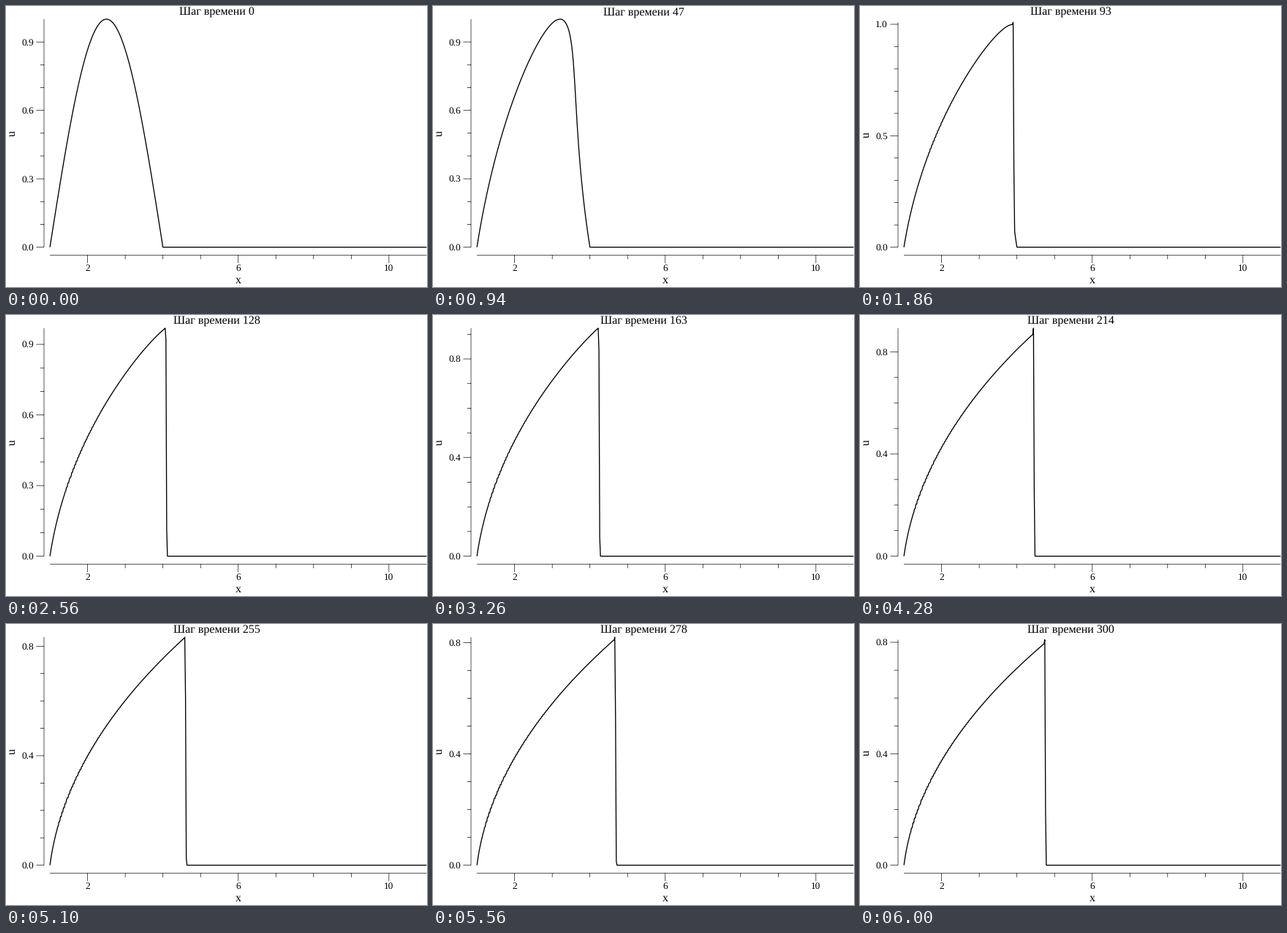
Recreate the animation shown at these times as a matplotlib script. Size 576 by 384 pixels, loop 6.02 s.

```python
import numpy as np
import matplotlib.pyplot as plt
from matplotlib.animation import FuncAnimation

plt.rcParams.update({
    "font.family": "Liberation Serif",
    "text.hinting": "none",
    "path.simplify": False,
})

W, H, DPI = 576, 384, 96
STEPS, CELLS = 300, 500
DT, DX = 0.015, 10 / CELLS

# Plot area in pixels
LEFT, RIGHT, TOP, BOTTOM = 60.1, 575.4, 18.0, 329.6
AXIS_X, AXIS_Y = 52.0, 340.7
MAJOR, MINOR = 10.67, 5.33
LABEL_ROOM = 7.0


def advance(u):
    """One flux-limited Lax-Wendroff step of u_t + (u^3 / 3)_x = 0."""
    r = DT / DX
    f = u ** 3 / 3
    d = np.diff(u)
    ratio = np.ones(CELLS - 1)
    np.divide(d[1:], d[:-1], out=ratio, where=d[:-1] != 0)
    limiter = np.concatenate([[0], np.clip(ratio, 0, 1)])
    flow = f[:-1] + 0.5 * limiter * (1 - r * u[:-1] ** 2) * np.diff(f)
    new = u.copy()
    new[1:-1] -= r * np.diff(flow)
    return new


x = 1 + DX * np.arange(CELLS + 1)
u = np.where(x < 4 - DX / 2, np.sin(np.pi * (x - 1) / 3), 0.0)
states = [u]
for _ in range(STEPS):
    states.append(advance(states[-1]))


def px(v):
    return LEFT + (v - 1) / 10 * (RIGHT - LEFT)


def tick_step(top):
    """Major tick distance in tenths for the range 0..top."""
    if top > 1:
        return 5
    return 4 if 0.8 <= top < 0.968 else 3


def segments(pairs):
    """Join separate strokes into one broken polyline."""
    xs, ys = [], []
    for (x0, y0), (x1, y1) in pairs:
        xs += [x0, x1, np.nan]
        ys += [y0, y1, np.nan]
    return xs, ys


fig = plt.figure(figsize=(W / DPI, H / DPI), dpi=DPI, facecolor="white")
ax = fig.add_axes([0, 0, 1, 1])
ax.set_xlim(0, W)
ax.set_ylim(H, 0)
ax.axis("off")


def thin(xs=(), ys=()):
    line, = ax.plot(xs, ys, color="black", lw=0.5, snap=False,
                    solid_capstyle="butt")
    return line


def label(px_x, px_y, text="", size=10, ha="center", **kw):
    return ax.text(px_x, px_y, text, fontsize=size, ha=ha, va="baseline",
                   color="black", **kw)


strokes = [((LEFT, AXIS_Y), (RIGHT, AXIS_Y))]
for v in range(2, 11):
    major = v % 4 == 2
    strokes.append(((px(v), AXIS_Y), (px(v), AXIS_Y + (MAJOR if major else MINOR))))
    if major:
        label(px(v), 362, str(v))
thin(*segments(strokes))
label((LEFT + RIGHT) / 2, 379, "x", 12)

title = label(W / 2, 13, size=12)
y_name = label(13, 174, "u", 12, rotation=90, rotation_mode="anchor")
y_axis = thin()
y_labels = [label(38, 0, ha="right") for _ in range(4)]
curve, = ax.plot([], [], color="black", lw=1, snap=False,
                 solid_capstyle="butt")


def draw(n):
    u = states[n]
    peak = u.max()
    step = tick_step(peak)
    last = int(peak * 10 / step + 1e-9) * step / 10

    # Leave room when the highest label would reach the title
    scale = min((BOTTOM - TOP) / peak, (BOTTOM - TOP - LABEL_ROOM) / last)

    def py(v):
        return BOTTOM - v * scale

    curve.set_data(px(x), py(u))
    strokes = [((AXIS_X, BOTTOM), (AXIS_X, py(peak)))]
    for text in y_labels:
        text.set_text("")
    for k in range(12):
        v = k / 10
        major = k % step == 0
        if v > peak or (not major and v > peak - 1e-3):
            break
        strokes.append(((AXIS_X - (MAJOR if major else MINOR), py(v)), (AXIS_X, py(v))))
        if major:
            text = y_labels[k // step]
            text.set_text(f"{v:.1f}")
            text.set_y(py(v) + 4.2)
    y_axis.set_data(*segments(strokes))
    y_name.set_y((BOTTOM + py(peak)) / 2)
    title.set_text(f"Шаг времени {n}")
    return [curve, y_axis, y_name, title, *y_labels]


anim = FuncAnimation(fig, draw, frames=STEPS + 1, interval=20,
                     repeat=True, repeat_delay=0)
plt.show()
```
